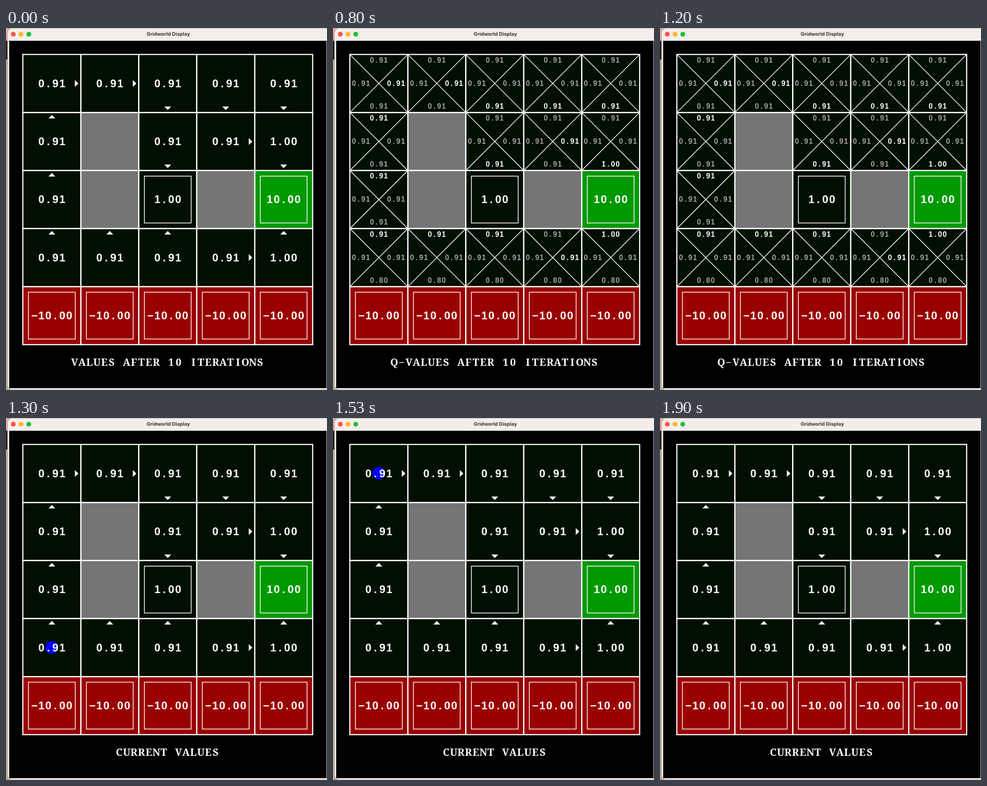
Write an HTML page with a canvas that moves like this. It is 705 px wide and 794 px high and loops after 1930 ms.

```html
<!DOCTYPE html>
<html lang="en">
<head>
<meta charset="utf-8">
<title>Gridworld Display</title>
<style>
html, body { margin: 0; overflow: hidden; background: #000; }
canvas { display: block; }
</style>
</head>
<body>
<canvas id="stage" width="705" height="794"></canvas>
<script>
const ctx = document.getElementById('stage').getContext('2d');
const LOOP = 1930, Q_START = 630, RUN_START = 1300, STEP = 68;
const CELL = 127.3, LEFT = 37, TOP = 58;
const SANS = '"Liberation Sans", Arial, sans-serif';
const SERIF = '"Noto Serif", serif';

// Best direction per cell; # wall, G goal, X exit, P pit
const grid = ['EESSS', 'N#SES', 'N#X#G', 'NNNEN', 'PPPPP'];
const path = [[0, 3], [0, 2], [0, 1], [0, 0], [1, 0], [2, 0], [2, 1], [2, 2]];
const fills = { '#': '#757575', G: '#009900', P: '#990000' };
const exits = { G: '10.00', X: '1.00', P: '−10.00' };
const turns = { N: 0, E: 1, S: 2, W: 3 };
const offsets = { N: [0, -51], E: [37.8, 0], S: [0, 50], W: [-39.3, 0] };

function rect(x, y, w, h, color) {
  ctx.fillStyle = color;
  ctx.fillRect(x, y, w, h);
}

function disc(x, y, r, color) {
  ctx.fillStyle = color;
  ctx.beginPath();
  ctx.arc(x, y, r, 0, 7);
  ctx.fill();
}

function frame(x, y, half, width) {
  ctx.strokeStyle = '#fff';
  ctx.lineWidth = width;
  ctx.strokeRect(x - half, y - half, half * 2, half * 2);
}

// Centres each character on a fixed pitch
function mono(text, x, baseline, pitch, font, color = '#fff') {
  ctx.font = font;
  ctx.fillStyle = color;
  ctx.textAlign = 'center';
  [...text].forEach((ch, i) =>
    ctx.fillText(ch, x + (i - (text.length - 1) / 2) * pitch, baseline));
}

const bigValue = (text, x, y) => mono(text, x, y + 8, 15.3, 'bold 24px ' + SANS);

function arrow(x, y, dir) {
  ctx.save();
  ctx.translate(x, y);
  ctx.rotate(turns[dir] * Math.PI / 2);
  ctx.fillStyle = '#fff';
  ctx.beginPath();
  ctx.moveTo(0, -58.3);
  ctx.lineTo(7.5, -50.6);
  ctx.lineTo(-7.5, -50.6);
  ctx.fill();
  ctx.restore();
}

function qValue(col, row, dir) {
  if (row === 3 && dir === 'S') return '0.80';
  const towardGoal = col === 4 && (row === 1 && dir === 'S' || row === 3 && dir === 'N');
  return towardGoal ? '1.00' : '0.91';
}

function qCell(x, y, col, row, best) {
  const h = CELL / 2;
  ctx.strokeStyle = '#fff';
  ctx.lineWidth = 1.5;
  ctx.beginPath();
  for (const s of [-1, 1]) {
    ctx.moveTo(x - h, y - h * s);
    ctx.lineTo(x + h, y + h * s);
  }
  ctx.stroke();
  for (const dir in offsets) {
    const [dx, dy] = offsets[dir];
    mono(qValue(col, row, dir), x + dx, y + dy + 5.2, 10.2,
      'bold 16px ' + SANS, dir === best ? '#fff' : '#a3a3a3');
  }
}

function drawCell(col, row, showQ, agent) {
  const kind = grid[row][col];
  const x = LEFT + (col + 0.5) * CELL, y = TOP + (row + 0.5) * CELL;
  rect(x - CELL / 2, y - CELL / 2, CELL, CELL, fills[kind] || '#000f00');
  if (exits[kind]) frame(x, y, 51.4, 1.6);
  else if (kind !== '#') {
    if (showQ) qCell(x, y, col, row, kind);
    else arrow(x, y, kind);
  }
  if (agent && agent[0] === col && agent[1] === row) disc(x - 0.5, y - 0.4, 13.8, '#00f');
  if (exits[kind]) bigValue(exits[kind], x, y);
  else if (kind !== '#' && !showQ) bigValue(qValue(col, row, kind), x, y);
}

function drawWindow() {
  rect(0, 0, 705, 794, '#b5ab98');
  rect(0, 0, 5, 28, '#d9a9a6');
  rect(0, 28, 3, 41, '#2a2118');
  ctx.fillStyle = '#f3eeec';
  ctx.beginPath();
  ctx.roundRect(4, 1, 710, 792, 9);
  ctx.fill();
  rect(7, 28, 697, 762, '#000');
  ['#fc5650', '#fdb32c', '#1fbf36'].forEach((c, i) => disc(16 + i * 17, 13.5, 5.3, c));
  ctx.font = 'bold 11px Inter, sans-serif';
  ctx.textAlign = 'center';
  ctx.fillStyle = '#3c3837';
  ctx.fillText('Gridworld Display', 356.5, 17.3);
}

function draw(now) {
  const t = now % LOOP;
  const running = t >= RUN_START;
  const showQ = t >= Q_START && !running;
  const agent = running && path[Math.floor((t - RUN_START) / STEP)];
  drawWindow();
  for (let row = 0; row < 5; row++)
    for (let col = 0; col < 5; col++) drawCell(col, row, showQ, agent);
  for (let row = 0; row < 5; row++)
    for (let col = 0; col < 5; col++)
      frame(LEFT + (col + 0.5) * CELL, TOP + (row + 0.5) * CELL, CELL / 2, 2.5);
  const caption = running ? 'CURRENT VALUES'
    : showQ ? 'Q−VALUES AFTER 10 ITERATIONS' : 'VALUES AFTER 10 ITERATIONS';
  mono(caption, 354.5, 741, 16.3, 'bold 22px ' + SERIF);
  requestAnimationFrame(draw);
}
requestAnimationFrame(draw);
</script>
</body>
</html>
```
